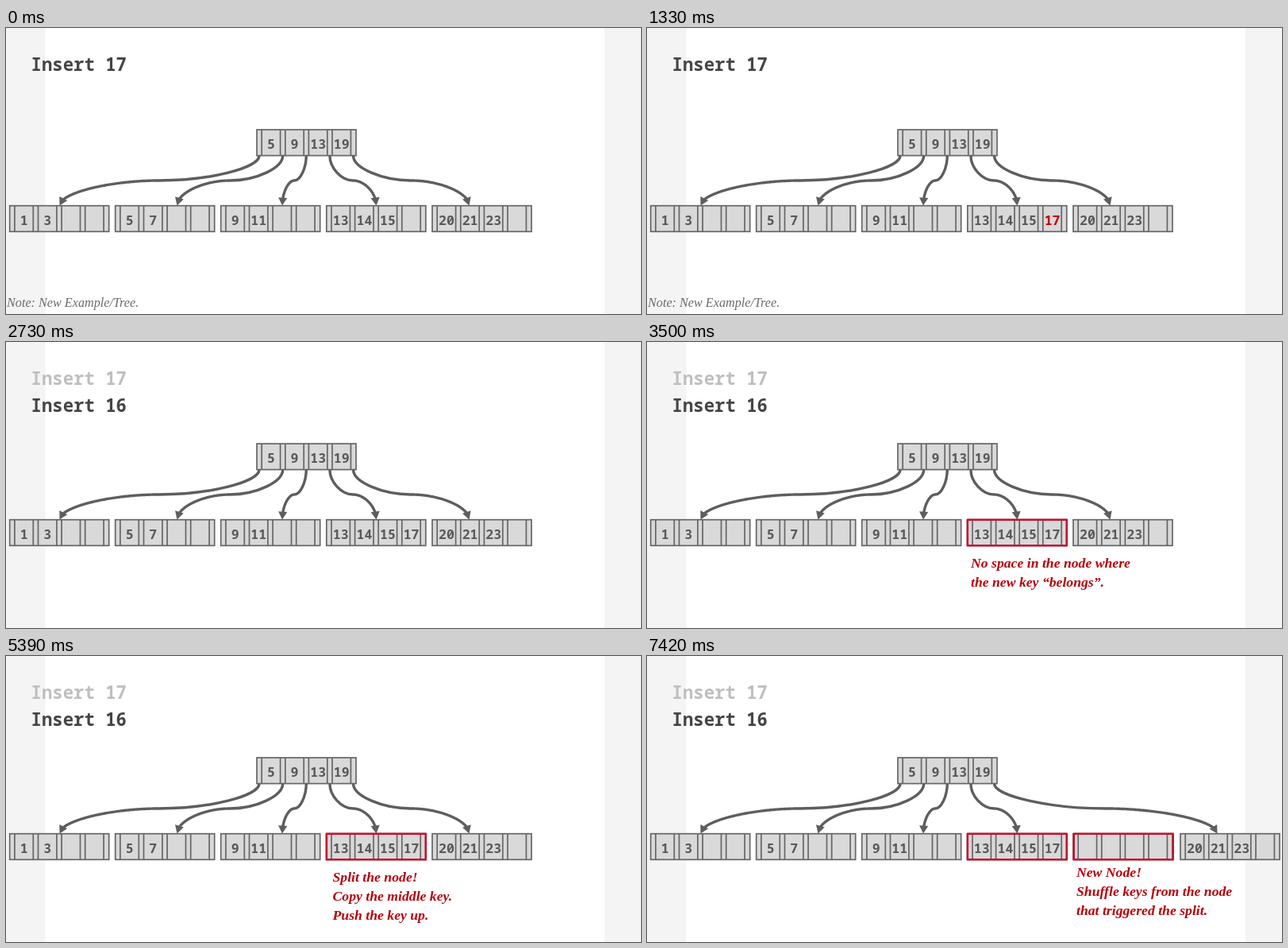
Animation of 800 by 360 pixels, one loop 8 s. Source, as an HTML page:

```html
<!DOCTYPE html>
<html lang="en">
<head>
<meta charset="utf-8">
<title>B+ tree insertion</title>
<style>
  html, body { margin: 0; width: 100%; height: 100%; overflow: hidden; background: #fff; }
  svg { display: block; }
  text { white-space: pre; }
  .title { font: 700 22.3px "Noto Sans Mono", monospace; fill: #454545; }
  .past { fill: #bfbfbf; }
  .key { font: 700 16.6px "Noto Sans Mono", monospace; fill: #595959; text-anchor: middle; }
  .new { fill: #c00000; }
  .note { font: italic 16.2px "Liberation Serif", serif; fill: #6a6a6a; }
  .message { font: italic 700 17.7px "Liberation Serif", serif; fill: #b80008; }
  .node { fill: #d9d9d9; stroke: #666; stroke-width: 1.7; }
  .marked { fill: none; stroke: #c4122f; stroke-width: 2.6; stroke-linejoin: round; }
  .link { fill: none; stroke: #5e5e5e; stroke-width: 3.4; }
  .head { fill: #5e5e5e; }
</style>
</head>
<body>
<svg id="stage" width="800" height="360" viewBox="0 0 800 360"></svg>
<script>
const LOOP = 8000;
const NODE_W = 125, NODE_H = 32.6, PITCH = 29.6, SLOT = 6.2;
const ROOT_X = 316, ROOT_Y = 128, LEAF_Y = 223.7;
const LEAF_X = [4.7, 137.7, 270.7, 403.8, 537, 672];

const text = (cls, x, y, str) => `<text class="${cls}" x="${x}" y="${y}">${str}</text>`;
const lines = (x, y, rows) => rows.map((row, i) => text('message', x, y + i * 24.2, row)).join('');
const box = (cls, x, y) => `<rect class="${cls}" x="${x}" y="${y}" width="${NODE_W}" height="${NODE_H}"/>`;
const key = (x, y, slot, value, cls = '') =>
  text('key ' + cls, x + 18 + slot * PITCH, y + 24.2, value);

function node(x, y, keys) {
  let dividers = '';
  for (let i = 0; i < 4; i++) {
    const left = x + SLOT + i * PITCH;
    dividers += `M${left} ${y}v${NODE_H}M${left + PITCH - SLOT} ${y}v${NODE_H}`;
  }
  return box('node', x, y) + `<path class="node" d="${dividers}"/>` +
    keys.map((value, i) => key(x, y, i, value)).join('');
}
const leaf = (i, keys) => node(LEAF_X[i], LEAF_Y, keys);

// S-shaped link from a root slot down to a leaf, with an arrowhead at the end
function link(slot, endX) {
  const startX = ROOT_X + 3.1 + slot * PITCH, top = 160.5, bottom = 223.5;
  const mid = (top + bottom) / 2, half = (endX - startX) / 2, midX = startX + half;
  const bezier = (a, b, c, d, t) => {
    const u = 1 - t;
    return u * u * u * a + 3 * u * u * t * b + 3 * u * t * t * c + t * t * t * d;
  };
  let path = `M${startX} ${top}C${startX} ${(top + mid) / 2} ${startX + half / 2} ${mid} ${midX} ${mid}`;
  let x, y;
  for (let t = 0; t < 1; t += 0.01) {
    const nextX = bezier(midX, midX + half / 2, endX, endX, t);
    const nextY = bezier(mid, mid, (mid + bottom) / 2, bottom, t);
    if (Math.hypot(endX - nextX, bottom - nextY) < 7) break;
    x = nextX;
    y = nextY;
    path += `L${x} ${y}`;
  }
  const angle = Math.atan2(bottom - y, endX - x) * 180 / Math.PI;
  return `<path class="link" d="${path}"/>` +
    `<path class="head" d="M0 0L-10 -5.6V5.6Z" transform="translate(${endX} ${bottom}) rotate(${angle})"/>`;
}

// [start, end, content]
const layers = [
  [0, LOOP,
    '<path fill="#f4f4f4" d="M0 0H49.5V360H0ZM754 0H800V360H754Z"/>' +
    node(ROOT_X, ROOT_Y, [5, 9, 13, 19]) +
    leaf(0, [1, 3]) + leaf(1, [5, 7]) + leaf(2, [9, 11]) + leaf(3, [13, 14, 15]) +
    [67.5, 215.5, 348, 466.5].map((x, i) => link(i, x)).join('')],
  [0, 2660, text('title', 31.5, 54, 'Insert 17') + text('note', 1, 350.5, 'Note: New Example/Tree.')],
  [1260, 2660, key(LEAF_X[3], LEAF_Y, 3, 17, 'new')],
  [2660, LOOP, key(LEAF_X[3], LEAF_Y, 3, 17) +
    text('title past', 31.5, 54, 'Insert 17') + text('title', 31.5, 87.5, 'Insert 16')],
  [0, 6160, leaf(4, [20, 21, 23]) + link(4, 583.5)],
  [6160, LOOP, leaf(4, []) + box('marked', LEAF_X[4] + 0.7, LEAF_Y) +
    leaf(5, [20, 21, 23]) + link(4, 718.5)],
  [3150, LOOP, box('marked', LEAF_X[3], LEAF_Y)],
  [3150, 4130, lines(408, 284, ['No space in the node where', 'the new key “belongs”.'])],
  [4130, 6160, lines(411.5, 284, ['Split the node!', 'Copy the middle key.', 'Push the key up.'])],
  [6160, LOOP, lines(541, 278, ['New Node!', 'Shuffle keys from the node', 'that triggered the split.'])],
];

const stage = document.getElementById('stage');
stage.innerHTML = layers.map(([, , content]) => `<g>${content}</g>`).join('');

function draw() {
  const t = performance.now() % LOOP;
  layers.forEach(([start, end], i) => {
    stage.children[i].style.display = t >= start && t < end ? '' : 'none';
  });
  requestAnimationFrame(draw);
}
draw();
</script>
</body>
</html>
```
